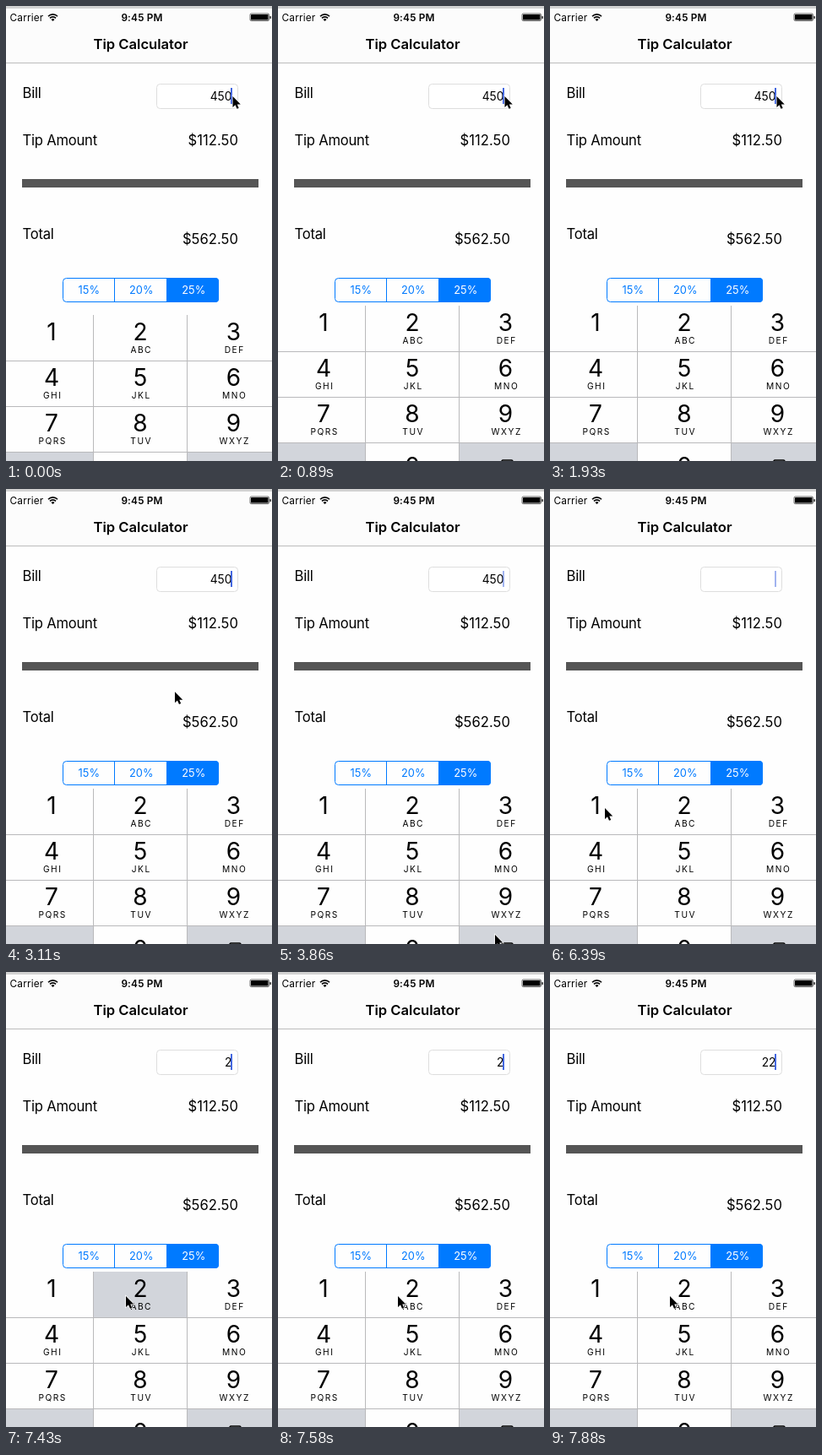
Recreate the animation shown at these times as an HTML page. Size 315x539 px, loop 8 s.

```html
<!DOCTYPE html>
<html lang="en">
<head>
<meta charset="utf-8">
<title>Tip Calculator</title>
<style>
html, body { margin: 0; width: 100%; height: 100%; overflow: hidden; background: #fefefe; }
svg { display: block; width: 315px; height: 539px; font-family: Inter, Roboto, "Liberation Sans", sans-serif; }
.label { font-size: 16.6px; letter-spacing: -.22px; }
.amount { font-size: 16.6px; letter-spacing: .05px; }
.title { font-size: 16.6px; font-weight: 600; letter-spacing: 0; }
.status { font-size: 11.8px; letter-spacing: .2px; }
.field { font-size: 13.8px; }
.segment { font-size: 12.8px; }
.digit { font-size: 28px; }
.letters { font-size: 10.2px; letter-spacing: 1.5px; }
.mid { text-anchor: middle; }
.end { text-anchor: end; }
</style>
</head>
<body>
<svg viewBox="0 0 315 539">
  <rect width="315" height="539" fill="#fefefe"/>
  <rect width="315" height="67" fill="#fcfcfc"/>
  <rect width="315" height="3" fill="#d2d2d2"/>
  <rect y="67" width="315" height="1" fill="#bcbcbc"/>

  <text class="status" x="4.5" y="17.5">Carrier</text>
  <g fill="none" stroke="#000" stroke-width="1.6">
    <path d="M50 12.2a7.6 7.6 0 0 1 11 0M52 14.4a4.8 4.8 0 0 1 7 0"/>
    <path d="M55.5 18l-2-2.1a2.9 2.9 0 0 1 4 0z" fill="#000" stroke="none"/>
  </g>
  <text class="status mid" x="161" y="17.5" font-weight="600">9:45 PM</text>
  <rect x="289" y="9" width="22.500" height="8.500" rx="1.500" fill="none" stroke="#000" stroke-width=".6"/>
  <rect x="290" y="10" width="20.500" height="6.500" rx=".6"/>
  <rect x="312.500" y="12" width="1.300" height="3" rx=".6"/>
  <text class="title mid" x="159.5" y="51">Tip Calculator</text>

  <g class="label">
    <text x="19.500" y="108.500">Bill</text>
    <text x="19.500" y="164.500">Tip Amount</text>
    <text x="19.500" y="275.500">Total</text>
  </g>
  <g class="amount end">
    <text x="275" y="164.500">$112.50</text>
    <text x="275" y="281.500">$562.50</text>
  </g>
  <rect x="178.5" y="92.5" width="96" height="29" rx="4" fill="#fff" stroke="#dedede"/>
  <text id="bill" class="field end" x="267.5" y="112"></text>
  <rect id="caret" x="266" y="97" width="2" height="19" fill="#4468e0"/>
  <rect x="19" y="205" width="280" height="10" fill="#555"/>

  <path d="M190 322h58a4 4 0 0 1 4 4v21a4 4 0 0 1-4 4h-58z" fill="#007aff"/>
  <g fill="none" stroke="#007aff">
    <rect x="67.5" y="322.5" width="184" height="28" rx="4"/>
    <path d="M128.5 322v29M190.5 322v29"/>
  </g>
  <g class="segment mid" fill="#007aff">
    <text x="98.300" y="341.300">15%</text>
    <text x="160.300" y="341.300">20%</text>
    <text x="222.300" y="341.300" fill="#fff">25%</text>
  </g>

  <g id="keypad">
    <rect y="355" width="315" height="220" fill="#fefefe"/>
    <path d="M0 517h103v60H0zM215 517h100v60H215z" fill="#d2d5db"/>
    <rect id="pressed" x="104" y="355" width="110" height="54" fill="#d2d5db"/>
    <path d="M0 409.5h315M0 463.5h315M0 517.5h315M103.5 355v220M214.5 355v220" stroke="#b9b9bb" fill="none"/>
    <g id="keys" class="mid"></g>
    <path d="M266 538h10.5a1.5 1.5 0 0 1 1.5 1.5v11a1.5 1.5 0 0 1-1.5 1.5h-10.5l-7-7z" fill="none" stroke="#000" stroke-width="1.5"/>
  </g>
  <path id="pointer" d="M0 0V13L3 10.300 5 14.800 7.200 13.900 5.300 9.500H9.300Z" stroke="#fff" stroke-width="1.400" paint-order="stroke"/>
</svg>
<script>
const LOOP = 8000, BEAT = 148.4; // the screen refreshes once per beat
const byId = id => document.getElementById(id);
const bill = byId('bill'), caret = byId('caret'), pressed = byId('pressed');
const keypad = byId('keypad'), pointer = byId('pointer');

const columns = [54, 159, 269.5];
const letters = ['', 'ABC', 'DEF', 'GHI', 'JKL', 'MNO', 'PQRS', 'TUV', 'WXYZ'];
byId('keys').innerHTML = letters.map((name, i) => {
  const x = columns[i % 3], y = 385 + 54 * Math.floor(i / 3);
  return `<text class="digit" x="${x}" y="${y}">${i + 1}</text>` +
    `<text class="letters" x="${x + 1.2}" y="${y + 15}">${name}</text>`;
}).join('') + '<text class="digit" x="159" y="555">0</text>';

const deletions = [29, 31, 33], entries = [50, 52];
const taps = [-1, ...deletions, ...entries];
const home = { x: 268.5, y: 107 };
const legs = [
  { from: 18, to: 26, x: 257, y: 528, bend: -150 },
  { from: 36, to: 40, x: 45, y: 377, bend: 0 },
  { from: 42, to: 43, x: 65, y: 378, bend: 0 },
  { from: 43, to: 48, x: 142, y: 384, bend: 0 }
];

const countBy = (beats, now) => beats.filter(beat => beat <= now).length;
const smooth = u => u * u * (3 - 2 * u);

// Solid for three beats after a tap, then a seven-beat fade out and in.
function caretOpacity(now) {
  const idle = now - taps.findLast(beat => beat <= now) - 3;
  const phase = idle % 7;
  if (idle < 0 || phase > 3) return 1;
  return phase % 3 ? 0 : .5;
}

function pointerAt(now) {
  let { x, y } = home;
  for (const leg of legs) {
    const u = smooth(Math.min(1, Math.max(0, (now - leg.from) / (leg.to - leg.from))));
    x += (leg.x - x) * u + 2 * u * (1 - u) * leg.bend;
    y += (leg.y - y) * u;
  }
  return `translate(${x} ${y})`;
}

function draw(t) {
  const now = Math.floor((t + 10) / BEAT);
  keypad.setAttribute('transform', `translate(0 ${Math.round(11 * .35 ** now)})`);
  bill.textContent = '450'.slice(0, 3 - countBy(deletions, now)) + '2'.repeat(countBy(entries, now));
  caret.setAttribute('opacity', caretOpacity(now));
  pressed.setAttribute('opacity', entries.includes(now) ? 1 : 0);
  pointer.setAttribute('transform', pointerAt(now));
}

const start = performance.now();
function tick() {
  draw((performance.now() - start) % LOOP);
  requestAnimationFrame(tick);
}
tick();
</script>
</body>
</html>
```
